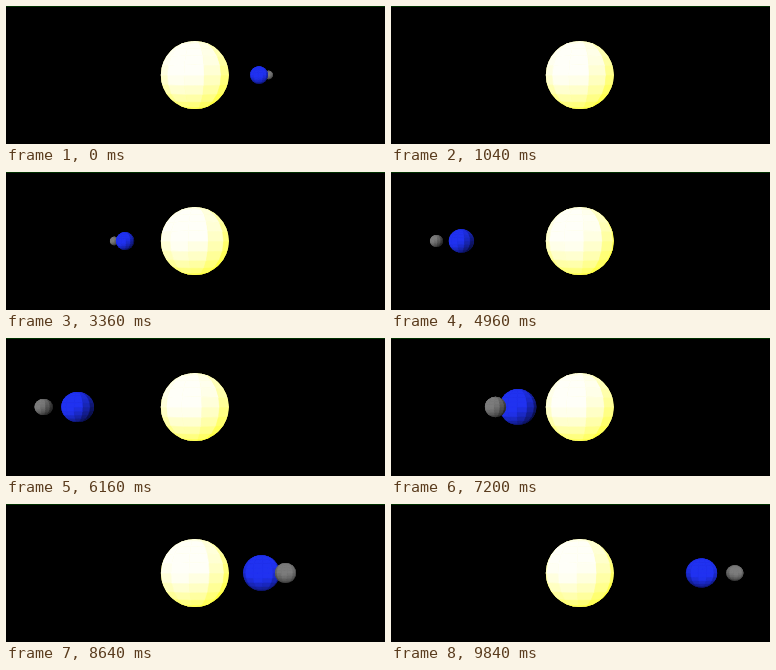
These frames come from a looping animation (379 by 138 pixels, 9.92 s). An HTML page with a canvas:

```html
<!DOCTYPE html>
<html lang="en">
<head>
<meta charset="utf-8">
<title>Sun, planet and moon</title>
<style>
html, body { margin: 0; width: 100%; height: 100%; overflow: hidden; background: #000; }
canvas { display: block; }
</style>
</head>
<body>
<canvas id="stage" width="379" height="138"></canvas>
<script>
const ctx = document.getElementById('stage').getContext('2d');
const LOOP = 9920, STEP = 80;
const FOCAL = 285, DIST = 25, CX = 188.8, CY = 69;
const LON = 12, LAT = 12;
const D_LON = 2 * Math.PI / LON, D_LAT = Math.PI / LAT;
const LIGHT = [-0.3, 0.48, 0.82];

const bodies = [
  { orbit: 0, size: 2.98, dark: [255, 255, 30], lit: [255, 255, 248], gain: 1.12 },
  { orbit: 10, size: 0.98, dark: [10, 14, 70], lit: [32, 50, 240], gain: 1.3 },
  { orbit: 12, size: 0.49, dark: [36, 36, 36], lit: [124, 124, 124], gain: 1.15 }
];

const mix = (a, b, k) => a + (b - a) * k;
const clamp = v => Math.max(0, Math.min(1, v));
const dot = (a, b) => a[0] * b[0] + a[1] * b[1] + a[2] * b[2];

function normal(lon, lat) {
  const c = Math.cos(lat);
  return [c * Math.sin(lon), Math.sin(lat), c * Math.cos(lon)];
}

// The camera sits at z = DIST and looks at the sun.
function project([x, y, z]) {
  const s = FOCAL / (DIST - z);
  return [CX + x * s, CY - y * s];
}

function shade(b, d) {
  const k = clamp((d + 0.45) / 1.45 * b.gain);
  return `rgb(${b.dark.map((v, i) => Math.round(mix(v, b.lit[i], k)))})`;
}

function drawBall(b, turn) {
  const center = normal(turn, 0).map(v => v * b.orbit);
  const at = (n, scale = 1) => n.map((v, i) => center[i] + v * b.size * scale);
  const [x] = project(center);
  const r = FOCAL * b.size / (DIST - center[2]);

  ctx.save();
  ctx.beginPath();
  ctx.ellipse(x, CY, r * Math.hypot(1, (x - CX) / FOCAL), r, 0, 0, 7);
  ctx.fillStyle = shade(b, 0.1);
  ctx.fill();
  ctx.clip();
  ctx.lineWidth = 0.6;
  for (let j = 0; j < LAT; j++) {
    for (let i = 0; i < LON; i++) {
      const lon = i * D_LON + turn, lat = j * D_LAT - Math.PI / 2;
      const n = normal(lon + D_LON / 2, lat + D_LAT / 2);
      const p = at(n);
      if (dot(n, [-p[0], -p[1], DIST - p[2]]) < 0) continue;
      ctx.beginPath();
      for (const [u, v] of [[0, 0], [0.5, 0], [1, 0], [1, 1], [0.5, 1], [0, 1]]) {
        ctx.lineTo(...project(at(normal(lon + u * D_LON, lat + v * D_LAT), 1.02)));
      }
      ctx.closePath();
      ctx.fillStyle = ctx.strokeStyle = shade(b, dot(n, LIGHT));
      ctx.fill();
      ctx.stroke();
    }
  }
  ctx.restore();
}

function draw(now) {
  const t = Math.floor(now % LOOP / STEP) * STEP / 1000;
  const turn = 0.5 * t - 0.803 + Math.PI;   // the whole scene turns as one
  ctx.fillStyle = '#000';
  ctx.fillRect(0, 0, 379, 138);
  ctx.fillStyle = '#003000';
  ctx.fillRect(0, 0, 379, 1);
  const order = Math.cos(turn) < 0 ? [2, 1, 0] : [0, 1, 2];
  for (const i of order) drawBall(bodies[i], turn);
  requestAnimationFrame(() => draw(performance.now()));
}

draw(performance.now());
</script>
</body>
</html>
```
